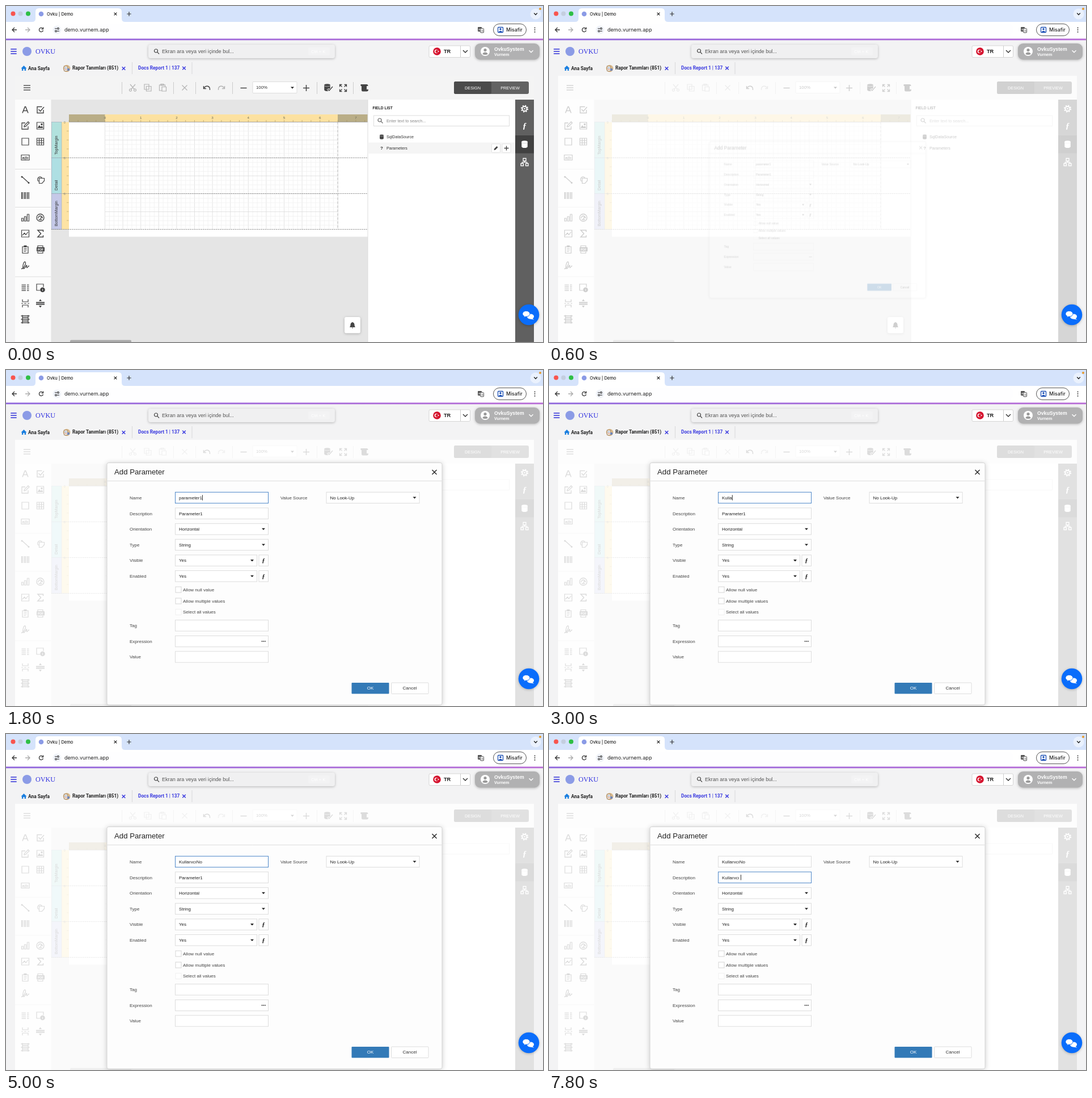
An HTML page that plays this animation: 947x592 px, repeating every 8 s.

```html
<!DOCTYPE html>
<html lang="tr">
<head>
<meta charset="utf-8">
<title>Add Parameter</title>
<style>
  html, body { margin: 0; width: 100%; height: 100%; overflow: hidden; background: #f3f3f4; }
  svg { display: block; width: 947px; height: 592px; font-family: "Liberation Sans", Arial, sans-serif; }
  text { white-space: pre; }
  .app { font-family: Roboto, sans-serif; font-weight: 700; }
  .ui { font-family: Inter, sans-serif; font-weight: 500; }
  .serif { font-family: "Liberation Serif", serif; }
  .soft { filter: drop-shadow(0 1px 2px rgba(0, 0, 0, .25)); }
  #hover { animation: hover 8s infinite step-end; }
  #shade { animation: shade 8s infinite; }
  #dialog { transform-origin: 473.5px 376.5px; animation: pop 8s infinite; }
  #ring { animation: ring 8s infinite step-end; }
  @keyframes hover { 0% { opacity: 1 } 6.7%, 100% { opacity: 0 } }
  @keyframes shade { 0%, 6.69% { opacity: 0 } 6.7% { opacity: .73 } 11.7%, 100% { opacity: .81 } }
  @keyframes pop {
    0%, 6.7% { opacity: 0; transform: scale(.55); animation-timing-function: ease }
    11.7%, 100% { opacity: 1; transform: none }
  }
  @keyframes ring { 0% { opacity: 0 } 11.7% { opacity: 1 } 19.5%, 100% { opacity: 0 } }
</style>
</head>
<body>
<svg id="stage" viewBox="0 0 947 592"></svg>
<script>
const INK = '#444', DIM = '#b4b4b4', BLUE = '#3b3be0';

const times = (n, fn) => Array.from({ length: n }, (_, i) => fn(i)).join('');
const rect = (x, y, w, h, fill, more = '') =>
  `<rect x="${x}" y="${y}" width="${w}" height="${h}" fill="${fill}" ${more}/>`;
const circle = (x, y, r, fill, more = '') => `<circle cx="${x}" cy="${y}" r="${r}" fill="${fill}" ${more}/>`;
// Text is placed by its vertical centre.
const text = (x, y, str, size, fill = '#333', more = '') =>
  `<text x="${x}" y="${y + size * .36}" font-size="${size}" fill="${fill}" ${more}>${str}</text>`;
const icon = (x, y, d, color = INK, width = 1.2) =>
  `<path transform="translate(${x} ${y})" d="${d}" fill="none" stroke="${color}" stroke-width="${width}"/>`;
const solid = (x, y, d, color = INK) => `<path transform="translate(${x} ${y})" d="${d}" fill="${color}"/>`;
const line = (x1, y1, x2, y2, color, more = '') =>
  `<path d="M${x1} ${y1}L${x2} ${y2}" stroke="${color}" ${more}/>`;
const cross = (x, y, r, color, width) => icon(x, y, `M${-r} ${-r}L${r} ${r}M${r} ${-r}L${-r} ${r}`, color, width);
const plus = (x, y, r, color, width) => icon(x, y, `M${-r} 0H${r}M0 ${-r}V${r}`, color, width);
const menu = (x, y, r, color, width) => icon(x, y, `M${-r} -4H${r}M${-r} 0H${r}M${-r} 4H${r}`, color, width);
const lens = (x, y, color) => icon(x, y, 'M2 -1A3 3 0 1 1 -4 -1A3 3 0 1 1 2 -1M1.2 1.2L4.5 4.5', color);
const arrow = (x, y) => solid(x, y, 'M-3 -1.5H3L0 1.8Z', '#222');
const chevron = (x, y, r, color) => icon(x, y, `M${-r} ${-r / 2}L0 ${r / 2}L${r} ${-r / 2}`, color, 1.4);
const cylinder = (x, y, color, s = 1) =>
  `<g transform="translate(${x} ${y}) scale(${s})" fill="${color}"><path d="M-5 -4V4C-5 7 5 7 5 4V-4Z"/><ellipse cy="-4" rx="5" ry="2"/>
  <path d="M-5 -3.5C-5 -1 5 -1 5 -3.5" fill="none" stroke="#ccc" stroke-width=".8"/></g>`;

const browser = () => `
  ${rect(0, 0, 947, 34, '#d5e3fb')}
  ${circle(12.5, 13.5, 4, '#f8554f')}${circle(25.5, 13.5, 4, '#c4cedf')}${circle(39, 13.5, 4, '#2fbf45')}
  <path d="M46 28Q52 28 52 22V10Q52 4 58 4H198Q204 4 204 10V22Q204 28 210 28Z" fill="#fff"/>
  ${rect(0, 28, 947, 30, '#fff')}
  ${circle(62, 14, 4.3, '#8b9be6')}
  ${text(72, 14, 'Ovku | Demo', 7.5, '#222', 'class="ui"')}
  ${cross(193, 14, 2.4, '#222', 1.2)}${plus(217, 14, 3.7, '#333', 1.2)}
  ${circle(934, 14, 9.5, '#eaf1fd')}${chevron(934, 14, 2.8, '#222')}${circle(942, 5, 2, '#e79b2c')}
  ${icon(15, 42, 'M4 0H-4M0 -4L-4 0L0 4', '#333', 1.3)}
  ${icon(38, 42, 'M-4 0H4M0 -4L4 0L0 4', '#aaa', 1.3)}
  ${icon(62, 42, 'M3.5 1A3.6 3.6 0 1 1 2.6 -2.6M3.6 -4.4V-1.4H.6', '#333', 1.3)}
  ${rect(82, 31, 737, 22, '#f9fafd', 'rx="11" opacity=".25"')}
  ${circle(90, 42, 7.5, '#f0f3f9')}
  ${icon(90, 42, 'M-4 -2.2H0M3.4 -2.2A1.4 1.4 0 1 1 .6 -2.2A1.4 1.4 0 1 1 3.4 -2.2M4 2.2H0M-.6 2.2A1.4 1.4 0 1 1 -3.4 2.2A1.4 1.4 0 1 1 -.6 2.2', '#333', 1.1)}
  ${text(103, 42, 'demo.vurnem.app', 9.1, '#222', 'class="ui" style="font-weight:400"')}
  ${rect(832, 37, 7, 8, '#555', 'rx="1"')}${rect(836.5, 39.5, 6, 7.5, '#fff', 'rx="1" stroke="#555"')}
  ${text(833, 41, 'a', 6, '#fff')}${text(837.5, 43.5, '文', 4.5, '#444', 'font-family="Noto Sans CJK SC, sans-serif"')}
  ${rect(859.5, 31.5, 58, 21, '#fff', 'rx="10.5" stroke="#555"')}
  ${rect(867.5, 37.5, 9, 9, 'none', 'rx="1" stroke="#1b4fb5" stroke-width="1.3"')}
  ${circle(872, 40.7, 1.7, '#1b4fb5')}${solid(872, 46, 'M-3.5 0Q0 -4.5 3.5 0Z', '#1b4fb5')}
  ${text(882, 42, 'Misafir', 8.7, '#222', 'class="ui"')}
  ${times(3, i => circle(932.5, 38.5 + i * 3.6, 1, '#333'))}
  ${rect(0, 57.5, 947, 2.8, 'url(#accent)')}`;

const header = () => `
  ${menu(13.5, 80, 5.2, '#2f2fd8', 1.4)}
  ${circle(37, 80, 8, '#8b9be6')}
  ${text(52, 80, 'OVKU', 12.1, '#3232e0', 'class="serif"')}
  <g class="soft">${rect(251, 68, 329, 24, '#f0f0f1', 'rx="4"')}</g>
  ${lens(265.5, 80, '#444')}
  ${text(275, 80, 'Ekran ara veya veri içinde bul...', 9.1, '#555')}
  ${rect(533, 73, 38, 14, '#f3f3f4', 'rx="3"')}${text(538, 80, 'Ctrl + K', 7.5, '#fff')}
  ${rect(746, 70, 72.5, 20.5, '#fff', 'rx="2" stroke="#ccc" stroke-width=".8"')}${line(801.5, 70, 801.5, 90, '#ccc')}
  ${circle(760, 80, 6.8, '#d5122d')}${circle(759, 80, 3.3, '#fff')}${circle(760, 80, 2.6, '#d5122d')}${circle(762.5, 80, 1.1, '#fff')}
  ${text(772, 80, 'TR', 9.2, '#222', 'font-weight="700"')}${chevron(810, 80, 4, '#333')}
  <g class="soft">${rect(827, 66, 114, 28.5, '#b1b1b2', 'rx="9"')}</g>
  ${circle(845, 80, 8, '#fff')}${circle(845, 77.5, 2.6, '#999')}${solid(845, 85.5, 'M-4.7 -.8Q-3.5 -4 0 -4Q3.5 -4 4.7 -.8Q0 2 -4.7 -.8Z', '#999')}
  ${text(861, 76, 'OvkuSystem', 8.7, '#fff', 'font-weight="700"')}${text(861, 85.5, 'Vurnem', 7.2, '#fff', 'font-weight="700"')}
  ${chevron(926, 80, 3.5, '#fff')}
  ${solid(31.5, 109.5, 'M-5 .5L0 -4.5L5 .5H3.6V4.5H1.2V1.5H-1.2V4.5H-3.6V.5Z', '#1a7fe0')}
  <g class="app">${text(39, 109.5, 'Ana Sayfa', 8.4, '#222')}${text(117, 109.5, 'Rapor Tanımları (851)', 8.3, '#222')}
  ${text(233, 109, 'Docs Report 1 | 137', 8.3, BLUE)}</g>
  ${circle(107, 110, 6.3, '#d9b98c')}${rect(102.5, 106, 6, 8.5, '#f5f1e8', 'stroke="#8a6a4a" stroke-width=".7"')}
  ${line(104, 109, 107, 109, '#5a8fd0')}${line(104, 111.5, 107, 111.5, '#d06a5a')}${circle(110, 112, 2.3, '#6f86b8')}
  ${cross(207.5, 110, 2.8, BLUE, 1.5)}${cross(314, 109.5, 2.8, BLUE, 1.5)}
  ${line(222.5, 99, 222.5, 120, '#d8d8da')}${line(328, 99, 328, 120, '#d8d8da')}`;

const toolbar = () => `
  ${rect(16, 123, 915, 42, '#f4f4f4')}
  ${menu(37, 144, 6, '#555', 1.4)}
  ${[204.5, 295.5, 334.5, 399.5, 548.5, 612.5].map(x => line(x, 134, x, 155, '#ccc')).join('')}
  ${icon(223.5, 144, 'M-4.5 -6L3.2 3M4.5 -6L-3.2 3M-2 4.2A2 2 0 1 1 -6 4.2A2 2 0 1 1 -2 4.2M6 4.2A2 2 0 1 1 2 4.2A2 2 0 1 1 6 4.2', DIM)}
  ${icon(250, 144, 'M-6 -6H2V3H-6ZM-2.5 -2.5H6V6H-2.5Z', DIM)}
  ${icon(276.5, 144, 'M-2 5H-6V-5H4V-2M-3.5 -6.5H1.5V-4H-3.5ZM-1.5 -1.5H6V6H-1.5Z', DIM)}
  ${cross(315, 144, 4.5, DIM, 1.3)}
  ${icon(354, 144, 'M-5.5 -3V1.5H-1M-5.5 1.5C-2 -5 6 -4 5.5 4', INK, 1.4)}
  ${icon(380, 144, 'M5.5 -3V1.5H1M5.5 1.5C2 -5 -6 -4 -5.5 4', DIM, 1.4)}
  ${line(413.5, 144.5, 424.5, 144.5, INK, 'stroke-width="1.5"')}${plus(529.5, 144.5, 5.5, INK, 1.5)}
  ${rect(435, 133.5, 78, 20, '#fff', 'rx="1" stroke="#ddd"')}${text(441, 143.5, '100%', 7.8)}${arrow(505, 144)}
  ${cylinder(566.5, 143.5, INK, 1.05)}${icon(571, 146, 'M-4 0L-1 3L5 -4', '#f4f4f4', 3.4)}${icon(571, 146, 'M-4 0L-1 3L5 -4', INK, 1.4)}
  ${icon(594.5, 144.5, 'M-6 -2V-6H-2M2 -6H6V-2M6 2V6H2M-2 6H-6V2M-5.5 -5.5L-2 -2M5.5 -5.5L2 -2M5.5 5.5L2 2M-5.5 5.5L-2 2', INK, 1.3)}
  ${solid(632, 144, 'M-6.5 -6H4Q6.5 -6 6.5 -3H4V3H7Q7 6.5 4 6.5H-3Q-5 6.5 -5 4V-3H-6.5Z')}
  ${rect(790, 133, 132, 22, '#626262', 'rx="3"')}${rect(790, 133, 66, 22, '#4b4b4b', 'rx="3"')}
  ${text(823, 144, 'DESIGN', 7.3, '#fff', 'text-anchor="middle"')}${text(889, 144, 'PREVIEW', 7.3, '#fff', 'text-anchor="middle"')}`;

const palette = () => `
  ${rect(16, 165, 63.5, 427, '#fcfcfc')}
  ${[287.5, 354.5, 477].map(y => line(16, y, 79, y, '#ddd')).join('')}
  ${icon(34, 183, 'M-5 5.5L-.6 -5.5H.6L5 5.5M-3.4 1.5H3.4', INK, 1.5)}
  ${icon(60.5, 183, 'M5.5 0V5.5H-5.5V-5.5H3M-3 -1L0 2.5L6.5 -5', INK, 1.4)}
  ${icon(34, 211, 'M5 1V6H-6V-5H0M-2 2L-1.5 -.5L5 -7L7 -5L.5 1.5Z', INK, 1.3)}
  ${icon(60.5, 211, 'M-6 -6H6V6H-6Z')}${solid(60.5, 211, 'M-5 4L-2 -1L1 2L3 0L5 4ZM1 -4H4V-1H1Z')}
  ${icon(34, 239, 'M-6 -6H6V6H-6Z')}
  ${icon(60.5, 239, 'M-6 -6H6V6H-6ZM-6 -2H6M-6 2H6M-2 -6V6M2 -6V6')}
  ${icon(34, 267, 'M-7 -4.5H7V4.5H-7Z')}${text(34, 267, 'a|b', 7.5, INK, 'text-anchor="middle" font-weight="700"')}
  ${icon(34, 306, 'M-5.5 -5L5.5 5', INK, 1.3)}${circle(28, 301, 1.5, INK)}${circle(40, 311.5, 1.5, INK)}
  ${icon(60.5, 306, 'M-3 3A4.3 4.3 0 1 1 3 -3M-2 -2.5H7V2L3 6.5H-2Z')}
  ${times(6, i => rect(27 + i * 2.6, 328, i % 2 ? 1 : 1.7, 12, INK))}
  ${icon(34, 373, 'M-6.5 6V1H-3.5V6ZM-1.5 6V-2H1.5V6ZM3.5 6V-6H6.5V6Z')}
  ${icon(60.5, 373, 'M6.5 0A6.5 6.5 0 1 1 -6.5 0A6.5 6.5 0 1 1 6.5 0M-4 1A4 4 0 0 1 4 1M0 2L3 -2M-3 3.5H3', INK, 1.3)}
  ${icon(34, 401, 'M-6.5 -6H6.5V6H-6.5ZM-5 3L-1.5 -1L1 2L5 -3')}
  ${icon(60.5, 401, 'M5 -3V-6H-4.5L1 0L-4.5 6H5V3', INK, 1.5)}
  ${icon(34, 429, 'M-5 -5H5V6.5H-5ZM-2.5 -1.5H2.5M-2.5 1H2.5M-2.5 3.5H1')}${rect(31.5, 421.8, 5, 3.4, INK)}
  ${rect(54, 425, 14, 7.5, INK, 'rx="1"')}${icon(60.5, 429, 'M-4.5 -4V-6.5H4.5V-4M-4.5 4V6.5H4.5V4')}
  ${text(61, 428.8, 'PDF', 5.2, '#fff', 'text-anchor="middle" font-weight="700"')}
  ${icon(34, 457, 'M-7 6C-3 6 2 -3 0 -6C-3 -8 -5 2 -4 5C-2 8 1 1 2 0C4 -1 1 4 3 4C5 4 4 1 7 1', INK, 1.3)}
  ${times(5, i => icon(34, 491 + i * 2.6, 'M-6.5 0H1M3 0H6.5', INK, 1.1))}
  ${icon(60.5, 496, 'M0 5H-6.5V-6H5.5V-1')}${circle(64.5, 500, 4.3, INK)}${text(64.5, 500, 'i', 6, '#fff', 'text-anchor="middle" font-weight="700"')}
  ${icon(34, 524, 'M-5 -7V-3H5V-7M-5 7V3H5V7M-7 0H-4M-2 0H2M4 0H7')}
  ${icon(60.5, 524, 'M-7.5 -1.6H7.5M-7.5 1.6H7.5', INK, 2)}${solid(60.5, 524, 'M-2.5 -4H2.5L0 -7.5ZM-2.5 4H2.5L0 7.5Z')}
  ${icon(34, 552, 'M-5 -3H5V3H-5ZM-7.5 -6H7.5M-7.5 6H7.5M-5 -7.5V7.5M5 -7.5V7.5M-7.5 0H7.5', INK, 1.3)}`;

const band = (i, label, fill, end) => {
  const y = 204.5 + i * 63;
  return `${rect(80.5, y, 17.5, 63, fill, 'stroke="#9ab" stroke-width=".6"')}
    <g transform="translate(88.5 ${end}) rotate(-90)">${text(0, 0, label, 7.2, '#333')}</g>
    ${line(80, y + 63, 638, y + 63, '#888', 'stroke-dasharray="2 1.3"')}
    ${text(102, y + 1, i ? '0' : '0', 5, '#776')}
    ${times(3, k => line(107, y + 15.8 * (k + 1), 110.5, y + 15.8 * (k + 1), '#b9a46a', 'stroke-width=".7"'))}`;
};

const canvas = () => `
  ${rect(79.5, 165, 558.5, 427, '#e5e5e5')}
  ${rect(111, 191, 527, 13.5, '#b9ad86')}${rect(174.5, 191, 410.5, 13.5, '#fce1a0')}
  ${rect(111, 204.5, 527, 202, '#fff')}${rect(98, 204.5, 13, 189, '#fde3a4')}
  ${times(53, i => line(174.5 + i * 7.9, 205, 174.5 + i * 7.9, 393, i % 4 ? '#f0f0f0' : '#dcdcdc', 'stroke-width=".8"'))}
  ${times(24, i => line(174.5, 204.5 + i * 7.9, 585, 204.5 + i * 7.9, i % 4 ? '#f0f0f0' : '#dcdcdc', 'stroke-width=".8"'))}
  ${times(34, i => line(111.3 + i * 15.8, 201, 111.3 + i * 15.8, 204, '#a08f58', 'stroke-width=".6"'))}
  ${times(8, i => text(174.5 + i * 63.2, 197, i, 6.2, '#665', 'text-anchor="middle"'))}
  ${line(585, 204.5, 585, 393, '#bbb', 'stroke-dasharray="4 3"')}
  ${line(111, 204.5, 638, 204.5, '#999', 'stroke-width=".8"')}
  ${band(0, 'TopMargin', '#b1e1dd', 262)}${band(1, 'Detail', '#aedfe3', 325)}${band(2, 'BottomMargin', '#c5c9e8', 388)}
  ${rect(113, 588.5, 108, 5, '#aaa', 'rx="2"')}
  <g class="soft">${rect(597, 548, 28, 28.5, '#fff', 'rx="3"')}</g>
  ${solid(611, 562.5, 'M-5 3.5Q-3.5 2 -3.5 -1Q-3.5 -4.5 0 -5.5Q3.5 -4.5 3.5 -1Q3.5 2 5 3.5ZM-1.5 4.3H1.5Q0 6.5 -1.5 4.3Z')}`;

const fieldPanel = () => `
  ${rect(638, 165, 260, 427, '#fff')}${line(638, 165, 638, 592, '#ddd')}
  ${text(646.5, 179.5, 'FIELD LIST', 6.6, '#222', 'font-weight="700"')}
  ${rect(648.5, 193, 239, 18.5, '#fff', 'stroke="#ddd"')}${lens(660, 202, '#666')}
  ${text(671, 202.5, 'Enter text to search...', 7.3, '#888')}
  ${cylinder(662.5, 230.5, INK, .68)}${text(671, 230, 'SqlDataSource', 7.15)}
  <g id="hover">${rect(638.5, 240.5, 259.5, 19.5, '#f5f5f5')}
    ${[864, 882.5].map(x => rect(x - 7.5, 243, 15, 15, '#fff', 'rx="1" stroke="#ddd" stroke-width=".8"')).join('')}
    ${solid(864, 250.5, 'M-3.5 3.5L-3 1L1.5 -3.5L3.5 -1.5L-1 3Z')}${plus(882.5, 250.5, 4, INK, 1.4)}</g>
  ${text(660, 250, '?', 8, '#333', 'font-weight="700"')}${text(671, 250, 'Parameters', 7.15)}
  ${rect(898, 165, 33, 427, '#606060')}${rect(898, 228, 33, 31.5, '#414141')}
  ${circle(914.5, 181, 4, 'none', 'stroke="#fff" stroke-width="1.8"')}${circle(914.5, 181, 5.6, 'none', 'stroke="#fff" stroke-width="2" stroke-dasharray="2.2 2.2"')}
  ${circle(914.5, 181, 1.3, '#fff')}
  ${text(914.5, 211, 'ƒ', 15, '#fff', 'class="serif" font-weight="700" font-style="italic" text-anchor="middle"')}
  ${cylinder(914.5, 243.5, '#fff', 1.05)}
  ${icon(914.5, 275, 'M-2.5 -6.5H2.5V-2H-2.5ZM-6.5 2.5H-2V6.5H-6.5ZM2 2.5H6.5V6.5H2ZM0 -2V.3M-4.3 2.5V.3H4.3V2.5', '#fff', 1.3)}`;

const box = (x, y, w, id = '') => rect(x, y - 9.7, w, 19.4, '#fff', `stroke="#ddd" ${id && `id="${id}Box"`}`);
const label = (y, str, x = 218) => text(x, y, str, 8, '#444');
const input = (y, name, id = '') => label(y, name) + box(298.5, y, 164, id) +
  (id ? text(305, y, '', 8, '#222', `id="${id}"`) : '');
const combo = (x, y, w, value) => box(x, y, w) + text(x + 6.5, y, value, 8, '#222') + arrow(x + w - 8.5, y);
const toggle = (y, name) => label(y, name) + combo(298.5, y, 144, 'Yes') + box(446, y, 16.5) +
  text(454, y - .5, 'ƒ', 11, '#222', 'class="serif" font-weight="700" font-style="italic" text-anchor="middle"');
const check = (y, name, stroke = '#d5d5d5') =>
  rect(299, y - 5, 10, 10, '#fff', `stroke="${stroke}"`) + label(y, name, 312);

const dialog = () => `<g id="dialog">
  <g style="filter:drop-shadow(0 1px 4px rgba(0,0,0,.2))">${rect(178, 163.5, 591, 426.5, '#fdfdfd', 'rx="3" stroke="#d4d4d4"')}</g>
  ${rect(178, 163.5, 591, 426.5, 'none', 'id="ring" rx="3" stroke="#4c86c0" stroke-width="1.2"')}
  ${line(178.5, 195.5, 768.5, 195.5, '#ddd')}
  ${text(191, 179.5, 'Add Parameter', 13.2, '#222')}${cross(755.5, 180, 4, '#222', 1.4)}
  ${input(225, 'Name', 'name')}${input(252.7, 'Description', 'desc')}
  ${label(280.3, 'Orientation')}${combo(298.5, 280.3, 164, 'Horizontal')}
  ${label(308, 'Type')}${combo(298.5, 308, 164, 'String')}
  ${toggle(335.6, 'Visible')}${toggle(363.2, 'Enabled')}
  ${check(387, 'Allow null value')}${check(407, 'Allow multiple values')}${check(426.5, 'Select all values', '#f0f0f0')}
  ${input(450.3, 'Tag')}${input(478, 'Expression')}${input(505.5, 'Value')}
  ${times(3, i => circle(451.5 + i * 2.7, 478, .9, '#333'))}
  ${label(225, 'Value Source', 484)}${combo(565, 225, 164, 'No Look-Up')}
  ${rect(609.5, 551, 66, 19.5, '#337ab7', 'rx="1"')}${text(642.5, 560.5, 'OK', 8, '#fff', 'text-anchor="middle"')}
  ${rect(679.5, 551, 65.5, 19.5, '#fff', 'rx="1" stroke="#ddd"')}${text(712, 560.5, 'Cancel', 8, '#333', 'text-anchor="middle"')}
  ${rect(0, 0, .9, 9.5, '#111', 'id="caret"')}</g>`;

const chat = () => `<g class="soft">${circle(922, 544, 18.3, '#0a6dfb')}</g>
  ${solid(925, 547, 'M-6 0A6 4.6 0 1 1 3.5 3.8L6.5 5.5L-1 4.6A6 4.6 0 0 1 -6 0Z', '#fff')}
  <path d="M914 546.500L912 549L916.500 547.200A6.500 5 0 1 0 914 546.500Z" fill="#fff" stroke="#0a6dfb"/>`;

const $ = id => document.getElementById(id);
$('stage').innerHTML = `<defs><linearGradient id="accent"><stop stop-color="#8f66dc"/><stop offset="1" stop-color="#b86bd6"/></linearGradient></defs>
  ${rect(0, 0, 947, 592, '#f3f3f4')}${browser()}${header()}
  ${toolbar()}${palette()}${canvas()}${fieldPanel()}
  ${rect(16, 123, 915, 469, '#fff', 'id="shade"')}${dialog()}${chat()}`;

// Each key: [ms, field, value]
const keys = [
  [0, '', ''], [1560, 'name', 'parameter1'], [2360, 'name', 'para'], [2560, 'name', ''],
  [2760, 'name', 'Ku'], [2960, 'name', 'Kulla'], [3160, 'name', 'Kullan'], [3360, 'name', 'Kullanı'],
  [3560, 'name', 'Kullanıc'], [3760, 'name', 'Kullanıcı'], [3960, 'name', 'KullanıcıN'], [4160, 'name', 'KullanıcıNo'],
  [5760, 'desc', 'Parameter1'], [6560, 'desc', 'Para'], [6760, 'desc', ''], [6960, 'desc', 'K'],
  [7160, 'desc', 'Kul'], [7360, 'desc', 'Kulla'], [7560, 'desc', 'Kullanı'], [7760, 'desc', 'Kullanıcı ']
];
let start;

function draw(now) {
  start ??= now;
  const t = (now - start) % 8000;
  const values = { name: 'parameter1', desc: 'Parameter1' };
  let since = 0, focus = '';
  for (const [at, field, value] of keys) {
    if (at > t) break;
    [since, focus] = [at, field];
    if (field) values[field] = value;
  }
  for (const id in values) {
    if ($(id).textContent !== values[id]) $(id).textContent = values[id];
    $(id + 'Box').setAttribute('stroke', id === focus ? '#4c86c8' : '#ddd');
  }
  const caret = $('caret');
  caret.style.opacity = focus && (t - since) % 1000 < 500 ? 1 : 0;
  if (focus) {
    caret.setAttribute('x', 305 + $(focus).getComputedTextLength());
    caret.setAttribute('y', focus === 'name' ? 220.2 : 247.9);
  }
  requestAnimationFrame(draw);
}
requestAnimationFrame(draw);
</script>
</body>
</html>
```
